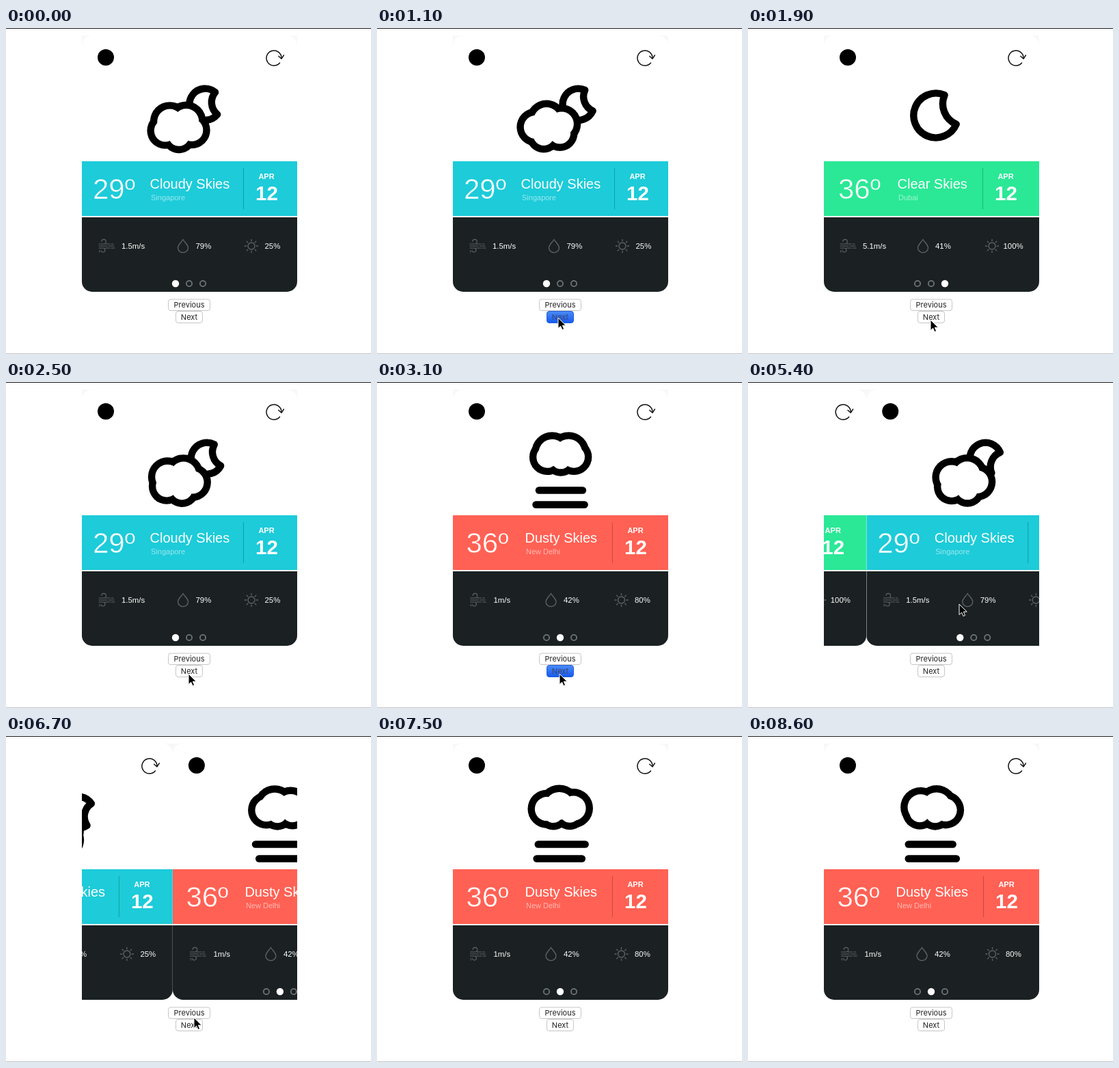
Write an HTML page that moves like this. It is 534 px wide and 477 px high and loops after 9.1 s.

```html
<!DOCTYPE html>
<html lang="en">
<head>
<meta charset="utf-8">
<title>Weather cards</title>
<style>
  html, body { margin: 0; width: 100%; height: 100%; overflow: hidden; background: #fff; }
  svg { display: block; width: 534px; height: 477px; }
  text { font-family: "Liberation Sans", Arial, sans-serif; fill: #fff; }
  .bold { font-weight: bold; text-anchor: middle; }
  .stat { font-size: 11.4px; }
  .button text { font: 11px Inter, Roboto, sans-serif; fill: #222; text-anchor: middle; }
  .glyph { fill: none; stroke: #5f6566; stroke-width: 1.3; stroke-linecap: round; }
</style>
</head>
<body>
<svg viewBox="0 0 534 477">
  <defs>
    <clipPath id="window"><rect x="111" y="11" width="315" height="375"/></clipPath>
    <clipPath id="cardShape"><rect x="111" y="11" width="315" height="375" rx="15"/></clipPath>
    <linearGradient id="blue" x2="0" y2="1">
      <stop stop-color="#4a8cf8"/><stop offset="1" stop-color="#1559ee"/>
    </linearGradient>
  </defs>
  <rect width="534" height="1" fill="#1c1c1c"/>
  <rect y="476" width="534" height="1" fill="#c4c4c4"/>
  <g id="cards" clip-path="url(#window)"></g>
  <g class="button">
    <rect x="237.5" y="397" width="61" height="16.5" rx="3.5" fill="#fff" stroke="#c6c6c6"/>
    <text x="268" y="409">Previous</text>
  </g>
  <g class="button">
    <rect id="nextFace" x="248.5" y="414.5" width="39" height="17" rx="3.5"/>
    <text id="nextLabel" x="268" y="427">Next</text>
  </g>
  <path id="cursor" d="M0 0V15.5L3.6 12.2L6 17.6L8.6 16.4L6.3 11.2H11.2Z"
        stroke="#fff" stroke-width="1" stroke-linejoin="round"/>
</svg>
<script>
const LOOP = 9100, LAST = 8600, STEP = 100;
const CARD = 315, SLIDE = 260;
const TAU = Math.PI * 2;
const ICON = { x: 203.5, y: 63, size: 130, stroke: 10.4 };

const slides = [1150, 1600, 2050, 2720, 3150, 5270, 6613];
const presses = [1100, 1500, 2000, 2700, 3100, 6500];
// time, x, y of the pointer tip
const pointer = [
  [100, 437, 456], [900, 265, 424], [1100, 265, 424], [1400, 267, 427], [3300, 267, 427],
  [4000, 328, 262], [4800, 300, 406], [5400, 309, 325], [6100, 267, 421], [6500, 267, 421],
  [6700, 275, 412], [7000, 290, 378], [7400, 385, 220]
];

const weather = [
  { color: '#1dcbd9', temp: '29º', tempX: 127, sky: 'Cloudy Skies', skyX: 210.5, city: 'Singapore',
    rule: 347, date: 381.5, wind: [135, 169, '1.5m/s'], rain: [259, 277.5, '79%'],
    sun: [359, 378.5, '25%'], icon: cloudyNight },
  { color: '#ff6154', temp: '36º', tempX: 130.5, sky: 'Dusty Skies', skyX: 216.5, city: 'New Delhi',
    rule: 344, date: 378.5, wind: [135.5, 170.5, '1m/s'], rain: [254.5, 273, '42%'],
    sun: [357.5, 377, '80%'], icon: fog },
  { color: '#2ae896', temp: '36º', tempX: 132, sky: 'Clear Skies', skyX: 218.5, city: 'Dubai',
    rule: 343, date: 377.5, wind: [134, 168, '5.1m/s'], rain: [256, 274, '41%'],
    sun: [357, 373.5, '100%'], icon: clearNight }
];

const $ = id => document.getElementById(id);

function sunGlyph() {
  let d = '';
  for (let i = 0; i < 8; i++) {
    const c = Math.cos(i * TAU / 8), s = Math.sin(i * TAU / 8);
    d += `M${c * 7.3} ${s * 7.3}L${c * 9.6} ${s * 9.6}`;
  }
  return `<circle r="5"/><path d="${d}"/>`;
}

const glyphs = {
  wind: '<path stroke-width="1.1" d="M1 -3H8A3.3 3.3 0 1 0 4.7 -6.5M11 -3H17M19 -3H22' +
        'M1 0H13M15 0H23M10 3H17M19 3H24M1 3H7A3 3 0 1 1 4 6.5M2 6.5A2 2 0 0 0 2 9"/>',
  rain: '<path d="M0 -9.5C2.5 -5.5 7.5 -1.5 7.5 2.5A7.5 7.2 0 0 1 -7.5 2.5C-7.5 -1.5 -2.5 -5.5 0 -9.5Z"/>',
  sun: sunGlyph()
};

function stat(kind, [iconX, textX, label]) {
  return `<g class="glyph" transform="translate(${iconX} 319)">${glyphs[kind]}</g>
    <text class="stat" x="${textX}" y="323">${label}</text>`;
}

function dots(active) {
  return [0, 1, 2].map(i => i === active
    ? `<circle cx="${248 + i * 20}" cy="374" r="5.2" fill="#fff"/>`
    : `<circle cx="${248 + i * 20}" cy="374" r="4.1" fill="none" stroke="#6f7576" stroke-width="1.8"/>`
  ).join('');
}

function cardMarkup(w, i) {
  return `<g class="card">
    <rect x="111" y="11" width="315" height="16" fill="#f8f8f8"/>
    <g clip-path="url(#cardShape)">
      <rect x="111" y="11" width="315" height="375" fill="#fff"/>
      <rect x="111" y="195" width="315" height="80" fill="${w.color}"/>
      <rect x="111" y="277" width="315" height="109" fill="#1b2122"/>
    </g>
    <circle cx="146" cy="43" r="12"/>
    <g fill="none" stroke="#111" stroke-width="1.5" stroke-linecap="round" stroke-linejoin="round">
      <path d="M400.5 51A11 11 0 1 1 403 44"/><path d="M398.8 41.2L403 45L406.4 39.8"/>
    </g>
    <g class="icon"></g>
    <text x="${w.tempX}" y="250" font-size="42" stroke="${w.color}" stroke-width=".6">${w.temp}</text>
    <text x="${w.skyX}" y="235" font-size="20">${w.sky}</text>
    <text x="${w.skyX + 1.5}" y="252" font-size="11" opacity=".55">${w.city}</text>
    <rect x="${w.rule}" y="205" width="1" height="60" opacity=".22"/>
    <text class="bold" x="${w.date - .5}" y="221" font-size="11">APR</text>
    <text class="bold" x="${w.date}" y="252" font-size="29.5">12</text>
    ${stat('wind', w.wind)}${stat('rain', w.rain)}${stat('sun', w.sun)}${dots(i)}
  </g>`;
}

// Five circles orbiting on an ellipse, swelling as they rise.
function puffs(turn, cx, cy, rx, ry, rmin, rmax, fill) {
  const grow = rmax - rmin;
  let out = '';
  for (let i = 0; i < 5; i++) {
    const a = (turn + i / 5) * TAU, c = Math.cos(a), s = Math.sin(a);
    out += `<circle cx="${cx - s * rx}" cy="${cy + c * ry + grow / 2}" r="${rmin + (1 - c / 2) * grow}" fill="${fill}"/>`;
  }
  return out;
}

function cloud(time, cx, cy, width, flat, small) {
  const k = ICON.stroke, turn = time / 30;
  const ring = (inset, fill) => puffs(turn, cx, cy, width * .21, width * flat,
    width * small - inset, width * .28 - inset, fill);
  return ring(0, '#000') + ring(k, '#fff');
}

function moon(time, cx, cy, width) {
  const r = width * .29 - ICON.stroke / 2;
  const swing = Math.cos(time / 15 * TAU), tilt = -swing * TAU / 16;
  cx += swing * width * .05;
  const tip = a => `${cx + r * Math.cos(a)} ${cy + r * Math.sin(a)}`;
  const low = tip(tilt + TAU / 8), high = tip(tilt - TAU / 8);
  return `<path d="M${low}A${r} ${r} 0 1 1 ${high}A${r} ${r} 0 0 0 ${low}Z"
    fill="none" stroke="#000" stroke-width="${ICON.stroke}" stroke-linejoin="round"/>`;
}

function cloudyNight(time) {
  const s = ICON.size;
  return moon(time, s * .667, s * .375, s * .75) + cloud(time, s * .375, s * .625, s * .75, .12, .24);
}

function clearNight(time) {
  const s = ICON.size;
  return moon(time, s / 2, s / 2, s);
}

function fog(time) {
  const s = ICON.size, k = ICON.stroke;
  const sway = phase => Math.cos((time / 5 + phase) * TAU) * s * .02;
  const bar = (y, phase) =>
    `<path d="M${s * .2 + k / 2 + sway(phase)} ${y}H${s * .8 - k / 2 + sway(phase + .25)}"
      stroke="#000" stroke-width="${k}" stroke-linecap="round"/>`;
  return cloud(time, s / 2, s * .32, s * .75, .06, .21) + bar(116.5, 0) + bar(95.5, .5);
}

// cubic-bezier(.25, .1, .25, 1)
function ease(x) {
  if (x <= 0) return 0;
  if (x >= 1) return 1;
  const curve = (u, a, b) => 3 * a * u * (1 - u) ** 2 + 3 * b * u * u * (1 - u) + u ** 3;
  let lo = 0, hi = 1;
  for (let i = 0; i < 24; i++) {
    const mid = (lo + hi) / 2;
    if (curve(mid, .25, .25) < x) lo = mid; else hi = mid;
  }
  return curve(lo, .1, 1);
}

function pointerAt(t) {
  const next = pointer.findIndex(p => p[0] >= t);
  if (next < 0 || t < pointer[0][0]) return null;
  if (next === 0) return pointer[0].slice(1);
  const [t0, x0, y0] = pointer[next - 1], [t1, x1, y1] = pointer[next];
  const f = (t - t0) / (t1 - t0), u = f * f * (3 - 2 * f);
  return [x0 + (x1 - x0) * u, y0 + (y1 - y0) * u];
}

$('cards').innerHTML = weather.map(cardMarkup).join('');
const cards = [...document.querySelectorAll('.card')];
const icons = [...document.querySelectorAll('.icon')];
icons.forEach(g => g.setAttribute('transform', `translate(${ICON.x} ${ICON.y})`));

function draw(t) {
  const position = slides.reduce((sum, start) => sum + ease((t - start) / SLIDE), 0);
  const iconTime = 11.83 + t / 1000 * 1.967;
  cards.forEach((card, i) => {
    let offset = (i - position) % 3;
    if (offset <= -1) offset += 3;
    const visible = offset < 1;
    card.style.display = visible ? '' : 'none';
    if (!visible) return;
    card.setAttribute('transform', `translate(${offset * CARD} 0)`);
    icons[i].innerHTML = weather[i].icon(iconTime);
  });

  const pressed = presses.some(p => t >= p && t < p + STEP);
  $('nextFace').setAttribute('fill', pressed ? 'url(#blue)' : '#fff');
  $('nextFace').setAttribute('stroke', pressed ? '#2460d8' : '#c6c6c6');
  $('nextLabel').style.fill = pressed ? '#3c4470' : '';

  const tip = pointerAt(t);
  $('cursor').style.display = tip ? '' : 'none';
  if (tip) $('cursor').setAttribute('transform', `translate(${tip})`);
}

const begin = performance.now();
function tick() {
  const t = (performance.now() - begin) % LOOP;
  draw(Math.min(LAST, Math.floor(t / STEP) * STEP));
  requestAnimationFrame(tick);
}
tick();
</script>
</body>
</html>
```
